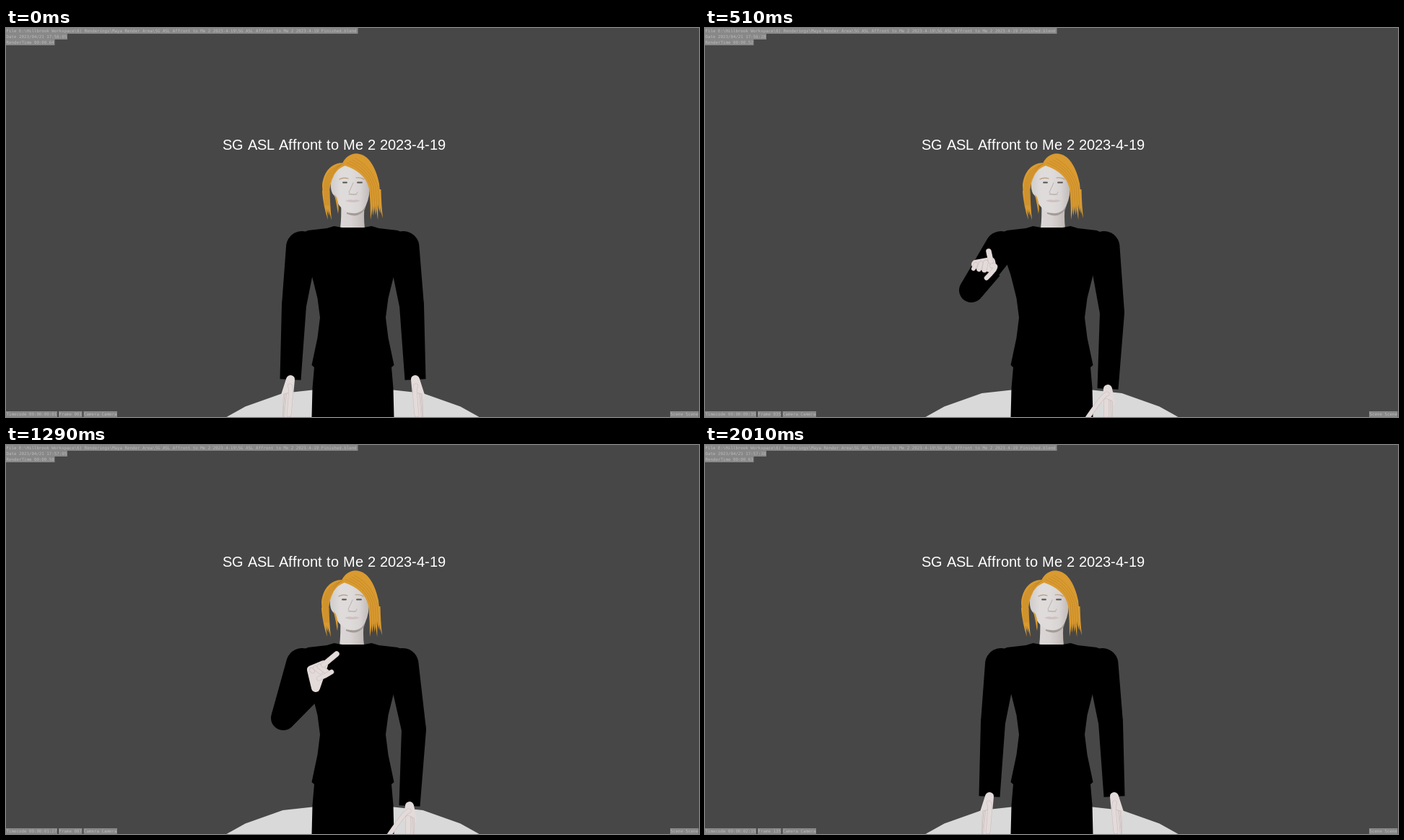
An HTML page with a canvas that plays this animation: 960x540 px, repeating every 2040 ms.

```html
<!DOCTYPE html>
<html lang="en">
<head>
<meta charset="utf-8">
<title>Sign animation</title>
<style>
html, body { margin: 0; width: 100%; height: 100%; overflow: hidden; background: #474747; }
canvas { display: block; }
</style>
</head>
<body>
<canvas id="stage" width="960" height="540"></canvas>
<script>
const ctx = document.getElementById('stage').getContext('2d');
const LOOP = 2040, STEP = 30, MID = 480.5;
const TITLE = 'SG ASL Affront to Me 2 2023-4-19';
const FILE = `File E:\\Hillbrook Workspace\\6) Renderings\\Maya Render Area\\${TITLE}\\${TITLE} Finished.blend`;
const SKIN = '#e3dada', CREASE = '#c9bebe', HAIR = '#d99a30', HAIR_DARK = '#b67c22';

const mirror = p => p.map((v, i) => i % 2 ? v : 2 * MID - v);
const shift = (p, dx, dy = 0) => p.map((v, i) => v + (i % 2 ? dy : dx));
const mix = (a, b, u) => [a[0] + (b[0] - a[0]) * u, a[1] + (b[1] - a[1]) * u];

// Joints: elbow, wrist, index and little knuckle, then tips of thumb, index, middle and little finger.
const rest = [399,385, 394,488, 392,510, 387,510, 392,537, 389,543, 387,545, 386,543];
const reach = [377,384, 382,470, 387,491, 371,493, 410,507, 390,522, 381,527, 368,514];
const point = [369,364, 398,334, 396,324, 375,328, 390,347, 393,310, 387,336, 372,334];
const self = [384,379, 429,337, 440,305, 423,312, 451,315, 451,280, 446,316, 425,314];
const tap = self.map((v, i) => v + (i == 10 ? 7 : i == 11 ? 10 : 0));
const lower = [372,388, 383,432, 403,429, 396,445, 431,429, 442,453, 436,460, 424,466];
const rest2 = mirror(rest);
const reach2 = [558,388, 573,495, 571,514, 581,515, 560,542, 574,546, 578,546, 583,545];
const tuck = [564,395, 558,501, 556,518, 562,520, 530,541, 556,546, 559,546, 562,546];

const tracks = {
  arm: [[0, rest], [240, reach], [510, point], [600, point], [900, self], [960, self],
    [1290, tap], [1530, lower], [1900, rest], [LOOP, rest]],
  arm2: [[0, rest2], [240, reach2], [510, tuck], [960, shift(tuck, 2)], [1290, shift(tuck, 1)],
    [1530, shift(tuck, 5, -4)], [1900, rest2], [LOOP, rest2]],
  sway: [[0, [0]], [240, [-2]], [510, [2]], [960, [-1]], [1290, [-1]], [1530, [1]], [1900, [0]], [LOOP, [0]]]
};

// Monotone cubic interpolation of every coordinate in a track.
function pose(track, t) {
  const k = track.findIndex(key => key[0] > t) - 1;
  const slope = (j, i) => j < 0 || j > track.length - 2 ? 0
    : (track[j + 1][1][i] - track[j][1][i]) / (track[j + 1][0] - track[j][0]);
  const tangent = (j, i) => {
    const a = slope(j - 1, i), b = slope(j, i);
    return a * b > 0 ? 2 * a * b / (a + b) : 0;
  };
  const [t0, p0] = track[k], [t1, p1] = track[k + 1];
  const h = t1 - t0, u = (t - t0) / h, s = u * u * (3 - 2 * u);
  return p0.map((v, i) => v + (p1[i] - v) * s
    + h * u * (1 - u) * ((1 - u) * tangent(k, i) - u * tangent(k + 1, i)));
}

function fill(path, color) {
  ctx.fillStyle = color;
  ctx.fill(new Path2D(path));
}
function stroke(path, color, width) {
  ctx.strokeStyle = color;
  ctx.lineWidth = width;
  ctx.stroke(new Path2D(path));
}
// A shape given by its right half, as offsets from the middle line.
function symmetric(half, color) {
  const right = half.map(([x, y]) => [MID + x, y]);
  const left = half.map(([x, y]) => [MID - x, y]).reverse();
  fill('M' + [...right, ...left].join('L') + 'Z', color);
}

// Tapered limb with a round start and a flat end.
function limb(a, ra, b, rb) {
  const dir = Math.atan2(b[1] - a[1], b[0] - a[0]), q = Math.PI / 2;
  ctx.beginPath();
  ctx.arc(...a, ra, dir + q, dir + 3 * q);
  for (const side of [-q, q])
    ctx.lineTo(b[0] + rb * Math.cos(dir + side), b[1] + rb * Math.sin(dir + side));
  ctx.fillStyle = '#000';
  ctx.fill();
}

function drawArm(shoulder, p) {
  const [elbow, wrist, index, little, thumbTip, indexTip, middleTip, littleTip] =
    Array.from({ length: 8 }, (_, i) => p.slice(2 * i, 2 * i + 2));
  limb(shoulder, 22, elbow, 17);
  limb(elbow, 17, wrist, 14.5);

  stroke(`M${wrist}L${index}L${little}Z`, SKIN, 12);
  fill(`M${wrist}L${index}L${little}Z`, SKIN);
  const finger = (path, width) => {
    stroke(path, CREASE, width + .6);
    stroke(path, SKIN, width - .6);
  };
  for (let i = 2; i >= 0; i--)
    finger(`M${mix(index, little, (i + 1) / 3)}L${mix(middleTip, littleTip, i / 2)}`, 6.5 - i / 2);
  finger(`M${index}L${indexTip}`, 7);
  const base = mix(wrist, index, .4);
  const bend = [0, 1].map(i => base[i] + .6 * (index[i] - little[i]));
  finger(`M${base}Q${bend} ${thumbTip}`, 6);
}

// Tapering locks that hang from one row and end at uneven heights.
function locks(n, x0, x1, top, tip0, tip1) {
  for (let i = 0; i < n; i++) {
    const u = i / (n - 1), x = x0 + (x1 - x0) * u, end = tip0 + (tip1 - tip0) * u;
    fill(`M${x - 2.5} ${top}Q${x - 1} ${top + 22} ${end} ${262 + 5 * Math.sin(i * 2.4 + 1)}Q${x + 3} ${top + 22} ${x + 2.5} ${top}Z`, HAIR);
  }
}

function gradient(...stops) {
  const g = ctx.createLinearGradient(450, 0, 505, 0);
  stops.forEach((color, i) => g.addColorStop(i / (stops.length - 1), color));
  return g;
}

function drawHead(dx) {
  ctx.save();
  ctx.translate(dx, 0);
  fill('M464 240Q465 262 463 278H497Q495 262 497 243Z', gradient('#dedada', '#d8d3d2', '#b5adab'));
  fill('M472 256Q488 260 500 242L497 252Q488 265 472 258Z', '#a39b98');
  fill('M469 189C455 192 449 206 450 222Q451 230 455 233Q460 248 470 254Q483 261 494 253Q503 243 504 222Q503 200 483 190Z',
    gradient('#cfcccb', '#dedbda', '#dedbda', '#d8d4d3', '#bdb6b4'));
  stroke('M462 210Q467 207 474 209M485 208Q491 207 496 210', '#b99878', 1.2);
  stroke('M467 214.5H472M487 214.5H493', '#58524f', 1.8);
  stroke('M481 215Q478 222 475 228Q476 231 480 231Q486 232 487 228M475 231H486', '#b9b0ad', 1);
  fill('M470 240Q476 237 481 239Q486 237 491 240Q481 244 470 240', '#cfc0c0');

  fill('M470 187C451 186 440 199 438 218L439 236H448Q447 218 455 203Q461 194 470 191Z', HAIR);
  locks(4, 440.5, 446, 226, 446, 451);
  fill('M455 231Q458 245 460 258Q462 246 458 235Z', HAIR);
  fill('M466 188C470 178 481 172 490 175C504 178 513 196 517 216L519 236H504Q505 228 502 220C499 207 485 195 466 190Z', HAIR);
  locks(6, 506, 517, 224, 505, 522);
  for (let i = 0; i < 4; i++) {
    stroke(`M${468 - i * 2} ${188 + i}Q${445 + i * 2} ${194 + i * 3} ${441 + i * 2} 216L${442 + i * 2} 246`, HAIR_DARK, .5);
    stroke(`M${472 + i * 4} ${187 - i * 2}Q${499 + i * 3} ${197 - i} ${506 + i * 3} 220L${508 + i * 3} 250`, HAIR_DARK, .5);
  }
  ctx.restore();
}

// Every letter advances by whole pixels.
function drawTitle() {
  ctx.font = '20px "Liberation Sans", Arial, sans-serif';
  ctx.fillStyle = '#fff';
  let x = 300;
  for (const c of TITLE) {
    ctx.fillText(c, x, 169);
    x += Math.round(ctx.measureText(c).width);
  }
}

function label(text, x, y) {
  ctx.font = '5.81px "DejaVu Sans Mono", monospace';
  ctx.fillStyle = '#888';
  ctx.fillRect(x, y, text.length * 3.5 + 1, 8);
  ctx.fillStyle = '#bbb';
  ctx.fillText(text, x + .5, y + 5.8);
}

function drawLabels(n) {
  const pad = (v, size = 2) => String(Math.floor(v)).padStart(size, '0');
  const frame = 1 + 2 * n, clock = 5 + 1.4 * n;
  label(FILE, 0, 0);
  label(`Date 2023/04/21 17:${pad(56 + clock / 60)}:${pad(clock % 60)}`, 0, 8);
  label(`RenderTime 00:00.${pad(58 + 6 * Math.cos(n / 5.5))}`, 0, 16);
  label(`Timecode 00:00:${pad(frame / 60)}:${pad(frame % 60)}`, 0, 532);
  label(`Frame ${pad(frame, 3)}`, 73, 532);
  label('Camera Camera', 107.5, 532);
  label('Scene Scene', 920, 532);
}

function draw(t) {
  const [sway] = pose(tracks.sway, t);
  ctx.fillStyle = '#474747';
  ctx.fillRect(0, 0, 960, 540);
  ctx.lineCap = ctx.lineJoin = 'round';
  symmetric([[0, 500.5], [56, 502.5], [97, 507], [149, 525.5], [175, 540]], '#d9d9d9');
  drawHead(sway);
  symmetric([[0, 277], [15, 277], [26, 275], [36, 278], [62, 281], [76, 287], [57, 343], [49, 375], [45.5, 402],
    [49, 430], [57, 468], [53.5, 471], [56, 500], [57, 541]], '#000');
  drawArm([550.5 + sway, 304], pose(tracks.arm2, t));
  drawArm([410, 304], pose(tracks.arm, t));
  drawTitle();
  drawLabels(t / STEP);
}

const start = performance.now();
function tick() {
  const t = (performance.now() - start) % LOOP;
  draw(Math.floor(t / STEP) * STEP);
  requestAnimationFrame(tick);
}
tick();
</script>
</body>
</html>
```
